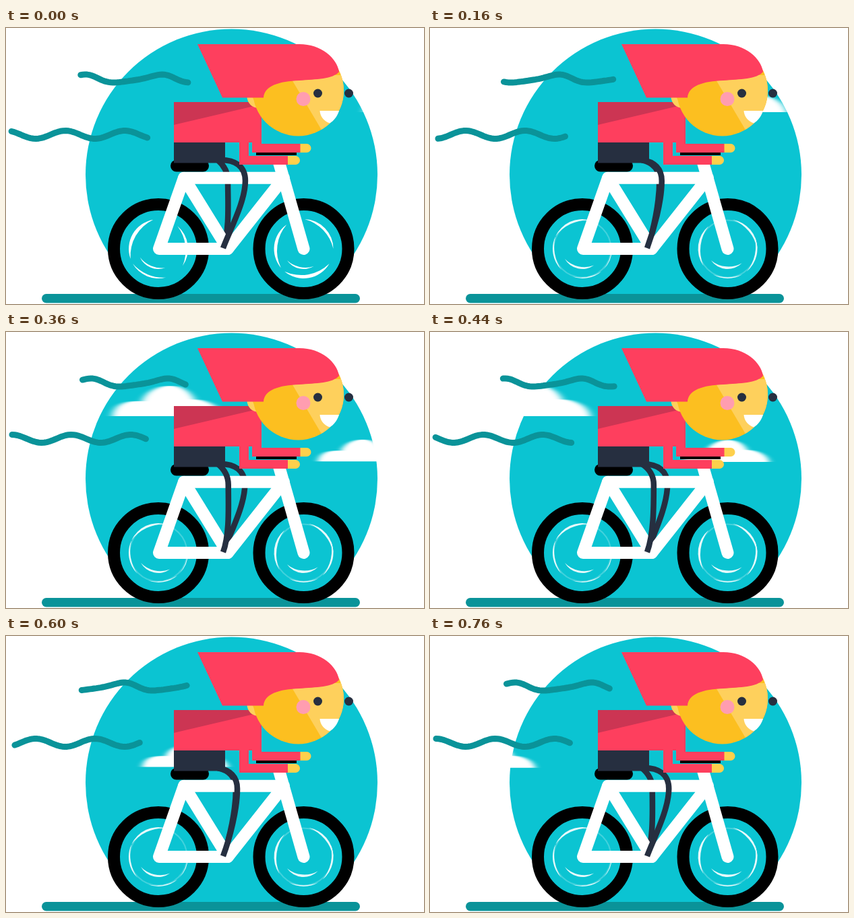
These frames come from a looping animation (620 px wide and 410 px high, 0.8 s). An HTML page:

```html
<!DOCTYPE html>
<html lang="en">
<head>
<meta charset="utf-8">
<title>Cyclist</title>
<style>
  html, body { margin: 0; width: 100%; height: 100%; overflow: hidden; background: #fff; }
  svg { display: block; }
  .line { fill: none; stroke-linecap: round; stroke-linejoin: round; }
  .leg { fill: none; stroke: #262f40; stroke-width: 8.500; }
  .wind { stroke: #0a9399; stroke-width: 9; }
  .shine path { fill: #fff; }
</style>
</head>
<body>
<svg width="620" height="410" viewBox="0 0 620 410">
  <defs>
    <clipPath id="sky"><path d="M0 0H620V400H0Z"/></clipPath>
    <clipPath id="face"><circle cx="433.500" cy="93" r="67.500"/></clipPath>
    <filter id="blur" x="-20%" y="0" width="140%" height="100%"><feGaussianBlur stdDeviation="6 0"/></filter>
    <filter id="soft"><feGaussianBlur stdDeviation=".7"/></filter>
    <path id="cloud" fill="#fff" filter="url(#blur)"
      d="M-82 0C-80 -18 -60 -24 -38 -22C-32 -38 -12 -45 4 -45C22 -45 34 -36 40 -25C58 -24 78 -16 82 0Z"/>
  </defs>

  <circle cx="334.500" cy="218" r="216.500" fill="#0bc4d2" clip-path="url(#sky)"/>
  <use id="cloudHigh" href="#cloud"/>
  <use id="cloudLow" href="#cloud"/>
  <path id="windHigh" class="line wind"/>
  <path id="windLow" class="line wind"/>
  <rect x="53" y="395" width="472" height="13.500" rx="6.700" fill="#0a9399"/>

  <g fill="none" stroke="#000" stroke-width="18">
    <circle cx="226" cy="328" r="66"/>
    <circle cx="441.500" cy="328" r="66"/>
  </g>
  <g id="crisp" class="shine"></g>
  <g id="blurred" class="shine" filter="url(#soft)" opacity=".9">
    <g fill="none" stroke="#fff" stroke-width="2" opacity=".25">
      <circle cx="226" cy="328" r="42.500"/>
      <circle cx="441.500" cy="328" r="42.500"/>
    </g>
  </g>

  <path id="backLeg" class="leg"/>
  <g class="line" stroke="#fff" stroke-width="18">
    <path d="M227 328L264 222.700H412L329 328Z"/>
    <path d="M264 222.700L329 328"/>
    <path d="M405 200L441.500 328"/>
  </g>
  <path id="frontLeg" class="leg"/>

  <rect x="244" y="196" width="57" height="17.500" rx="8.700"/>
  <path fill="#262f40" d="M249 170H325V200.500H249Z"/>
  <path fill="#fe3f5e" d="M249 110H372L379 133V170H249Z"/>
  <path fill="#cc3553" d="M249 110H372V115L249 144Z"/>

  <path d="M371 184H431V189H371Z"/>
  <path fill="#fe3f5e" d="M346 169H360V190H418V203H346ZM365 169H379V172H437V185H365Z"/>
  <path fill="#fed04c" d="M418 190H429.500A6.500 6.500 0 0 1 429.500 203H418ZM436.500 172H446A6.500 6.500 0 0 1 446 185H436.500Z"/>

  <path fill="#fed05c" d="M357.500 102H385V119H375A17 17 0 0 1 357.500 102Z"/>
  <path fill="#fcbf20" d="M365 102H385V117H374Z"/>
  <g clip-path="url(#face)">
    <path fill="#fcbf20" d="M360 20H510V170H360Z"/>
    <path fill="#fed05c" d="M420 70H510V170H479Z"/>
  </g>
  <path fill="#fe3f5e" d="M284 24H435C468 24 491 45 494 65C485 76 460 76 435 78C405 79 383 86 382 103.500H321Z"/>
  <circle cx="441" cy="105.500" r="10.500" fill="#ff9db0"/>
  <g fill="#262f40">
    <circle cx="462.500" cy="97" r="6.500"/>
    <circle cx="508.500" cy="97" r="6.500"/>
  </g>
  <path fill="#fff" d="M465.500 123H494C491 132 486 138 480 141.500C471 138 466 131 465.500 123Z"/>
</svg>
<script>
const LOOP = 800, STEP = 40, WAVE = 400, TAU = 2 * Math.PI;
const el = id => document.getElementById(id);
const swing = (t, peak) => Math.cos(TAU * (t - peak) / WAVE);

// Tapered arc around a hub, angles in degrees clockwise from the right.
function crescent(cx, r, from, to) {
  const point = a => [cx + r * Math.cos(a * TAU / 360), 328 + r * Math.sin(a * TAU / 360)].map(v => v.toFixed(1));
  const a = point(from), b = point(to), flat = r * 1.35;
  return `<path d="M${a}A${r} ${r} 0 0 1 ${b}A${flat} ${flat} 0 0 0 ${a}Z"/>`;
}
const shine = (id, arcs) => el(id).insertAdjacentHTML('beforeend', arcs.map(a => crescent(...a)).join(''));

const LEFT = 226, RIGHT = 441.5;
shine('crisp', [
  [LEFT, 44, 160, 260], [LEFT, 44, -50, 35], [LEFT, 44, 75, 150], [LEFT, 30, 70, 155],
  [RIGHT, 44, 140, 235], [RIGHT, 44, -88, 0], [RIGHT, 44, 30, 130], [RIGHT, 30, 60, 145]
]);
shine('blurred', [
  [LEFT, 44, 205, 285], [LEFT, 44, 135, 205], [LEFT, 44, 0, 45], [LEFT, 44, 50, 110], [LEFT, 30, 55, 150],
  [RIGHT, 44, -80, 0], [RIGHT, 44, -25, 50], [RIGHT, 44, 145, 230], [RIGHT, 44, 60, 120], [RIGHT, 30, 45, 145]
]);

function leg(knee) {
  const bend = knee - 328;
  return `M314 196C${322 + 0.7 * bend} ${204 - 0.35 * bend} ${knee} ${214 - 0.3 * bend} ${knee} 227` +
    `C${knee} 258 332 300 322 327`;
}

function wave(start, end, shape) {
  const points = [];
  for (let i = 0; i <= 50; i++) {
    const x = start + (end - start) * i / 50;
    points.push(x.toFixed(1) + ' ' + shape(x).toFixed(1));
  }
  return 'M' + points.join('L');
}

function draw(t) {
  el('cloudHigh').setAttribute('transform', `translate(${614 - 1.04 * t} 125)`);
  el('cloudLow').setAttribute('transform', `translate(${917 - 1.085 * t} ${189 + 0.009 * t}) scale(.78 .72)`);

  const w = t % WAVE;
  const troughHigh = 273.5 - 0.28 * w + 8 * swing(w, 100);
  el('windHigh').setAttribute('d', wave(111.5 - 4.5 * swing(w, 90), 269 + 6 * swing(w, 90), x => {
    const a = TAU * (x - troughHigh) / 114;
    return 75 + 6 * Math.cos(a - 0.5 * (1 - Math.cos(a)));
  }));
  const troughLow = 132 - 0.22 * w;
  el('windLow').setAttribute('d', wave(10.5 - 2.5 * swing(w, 20), 204 + 6 * swing(w, 20),
    x => 158.5 + 6 * Math.cos(TAU * (x - troughLow) / 88)));

  const knee = 328 + 28 * Math.abs(t - 385) / 400;
  el('frontLeg').setAttribute('d', leg(knee));
  el('backLeg').setAttribute('d', leg(684 - knee));

  el('crisp').style.display = t < STEP ? '' : 'none';
  el('blurred').style.display = t < STEP ? 'none' : '';
}

function tick() {
  draw(Math.floor(performance.now() % LOOP / STEP) * STEP);
  requestAnimationFrame(tick);
}
tick();
</script>
</body>
</html>
```
